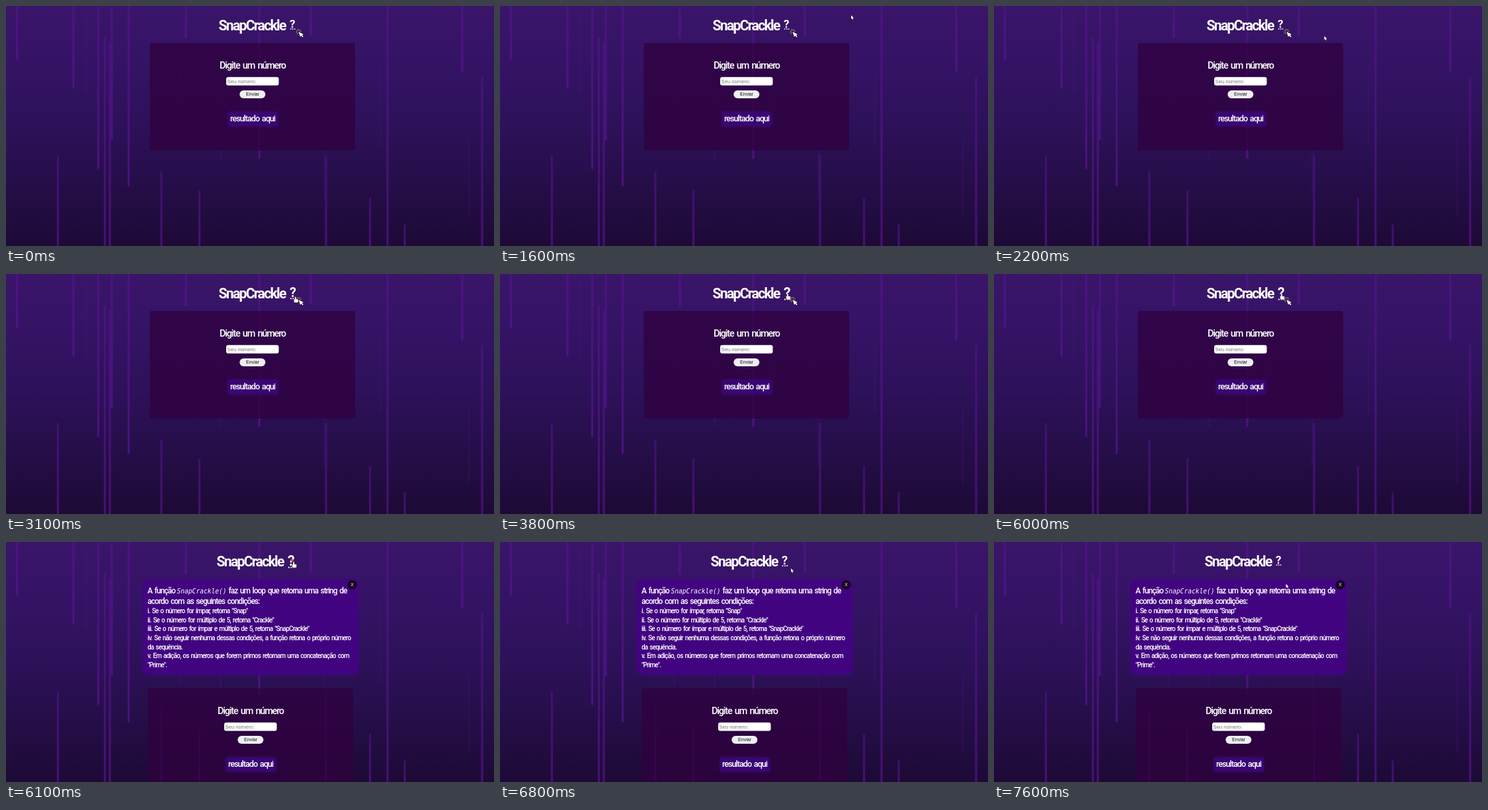
An HTML page with a canvas for the animation above (8 s loop, 738x364 px).

```html
<!DOCTYPE html>
<html lang="pt-BR">
<head>
<meta charset="utf-8">
<title>SnapCrackle</title>
<style>
html, body { margin: 0; width: 100%; height: 100%; overflow: hidden; background: #1d0b38; }
canvas { display: block; width: 738px; height: 364px; }
</style>
</head>
<body>
<canvas id="stage" width="738" height="364"></canvas>
<script>
const W = 738, H = 364, LOOP = 8000, STEP = 100;
const HOVER_AT = 2900, OPEN_AT = 6100, LEAVE_AT = 6600;
const ctx = document.getElementById('stage').getContext('2d');
const ARIAL = '"Liberation Sans", Arial, sans-serif';

// Rain: x and the y where it ends (hanging) or begins (standing)
const hanging = [[16.5, 81], [102, 125], [139.5, 247], [160, 203], [185.5, 273], [272, 49], [383, 232], [461, 45], [690, 100]];
const standing = [[78.5, 226], [149.5, 48], [157, 55], [235, 251], [292.5, 280], [484, 226], [550.5, 291], [577, 0], [603, 331], [720, 108]];

const rules = [
  'i. Se o número for ímpar, retorna "Snap"',
  'ii. Se o número for múltiplo de 5, retorna "Crackle"',
  'iii. Se o número for ímpar e múltiplo de 5, retorna "SnapCrackle"',
  'iv. Se não seguir nenhuma dessas condições, a função retona o próprio número',
  'da sequência.',
  'v. Em adição, os números que forem primos retornam uma concatenação com',
  '"Prime".'
];

// Pointer tip: time, x, y
const path = [
  [1600, 531, 14], [2200, 499.5, 45.5], [3000, 438, 36], [3400, 434.5, 30],
  [LEAVE_AT, 434.5, 30], [7200, 451, 60], [7500, 441.5, 63.5]
];

const clamp = v => Math.max(0, Math.min(1, v));
const mix = (a, b, u) => a + (b - a) * u;

function seeded(seed) {
  return () => (seed = seed * 16807 % 2147483647) / 2147483647;
}

function box(x, y, w, h, r, color, glow = 0) {
  ctx.fillStyle = ctx.shadowColor = color;
  ctx.shadowBlur = glow;
  ctx.beginPath();
  ctx.roundRect(x, y, w, h, r);
  ctx.fill();
  ctx.shadowBlur = 0;
}

function text(str, x, y, font, color, track = 0, gap = 0) {
  ctx.font = font;
  ctx.letterSpacing = track + 'px';
  ctx.wordSpacing = gap + 'px';
  ctx.fillStyle = color;
  ctx.fillText(str, x, y);
}

const label = (str, x, y, size, weight = 500) =>
  text(str, x, y, `${weight} ${size}px Roboto, sans-serif`, '#fff', size * -0.082, size * 0.127);

const plain = (str, x, y, size, color) => text(str, x, y, `${size}px ${ARIAL}`, color);

function streak(x, top, bottom, width, strength) {
  const fade = ctx.createLinearGradient(0, top, 0, bottom);
  fade.addColorStop(0, `rgba(92,20,148,${strength * 0.7})`);
  fade.addColorStop(1, `rgba(92,20,148,${strength})`);
  box(x - width / 2, top, width, bottom - top, width / 2, '#000');
  ctx.fillStyle = fade;
}

function rain(x, top, bottom, strength) {
  const fade = ctx.createLinearGradient(0, top, 0, bottom);
  fade.addColorStop(0, `rgba(92,20,148,${strength * 0.7})`);
  fade.addColorStop(1, `rgba(92,20,148,${strength})`);
  ctx.fillStyle = fade;
  ctx.fillRect(x - 1.6, top, 3.2, bottom - top);
}

function background() {
  const sky = ctx.createLinearGradient(0, 0, 0, H);
  ['#3a1569', '#341365', '#2d1159', '#250e48', '#1d0a36']
    .forEach((color, i, all) => sky.addColorStop(i / (all.length - 1), color));
  ctx.fillStyle = sky;
  ctx.fillRect(0, 0, W, H);
  const rnd = seeded(11);
  for (let i = 0; i < 8; i++) {
    const x = (i + rnd()) * W / 8, y = rnd() * 240;
    rain(x, y, y + 120, 0.15);
  }
  hanging.forEach(([x, end]) => rain(x, 0, end, 0.65));
  standing.forEach(([x, start]) => rain(x, start, H, 0.65));
}

function arrow(x, y, size, turn) {
  ctx.save();
  ctx.translate(x, y);
  ctx.rotate(turn);
  ctx.scale(size, size);
  ctx.beginPath();
  [[0, 0], [0, 5.8], [1.3, 4.7], [2.3, 6.8], [3.3, 6.3], [2.4, 4.3], [4.2, 4.2]]
    .forEach(p => ctx.lineTo(...p));
  ctx.closePath();
  ctx.lineWidth = 0.8;
  ctx.strokeStyle = '#1a0a28';
  ctx.stroke();
  ctx.fillStyle = '#fff';
  ctx.fill();
  ctx.restore();
}

function hand(x, y) {
  for (const [edge, color] of [[0.5, '#241033'], [0, '#fff']]) {
    const part = (dx, dy, w, h) =>
      box(x + dx - edge, y + dy - edge, w + 2 * edge, h + 2 * edge, 1, color);
    part(-0.3, 0, 1.8, 6);
    part(-1.6, 3.8, 6.4, 5);
  }
}

function clickIcon() {
  ctx.strokeStyle = '#d8ad38';
  ctx.lineWidth = 1;
  for (let i = 0; i < 6; i++) {
    const a = 2.1 + i * 0.78, c = Math.cos(a), s = Math.sin(a);
    ctx.beginPath();
    ctx.moveTo(442.5 + c * 2, 39 + s * 2);
    ctx.lineTo(442.5 + c * 4.2, 39 + s * 4.2);
    ctx.stroke();
  }
  arrow(442.5, 39, 1.45, -0.3);
}

function header(t, dx) {
  label('SnapCrackle', 321.5 + dx, 36.8, 21.2, 700);
  const hover = clamp((t - HOVER_AT) / 300) - clamp((t - LEAVE_AT) / 300);
  ctx.save();
  ctx.translate(429.5 + dx, 20);
  ctx.scale(1 + hover / 4, 1 + hover / 4);
  label('?', -0.5, 13, 17, 600);
  for (let i = 0; i < 3; i++) box(0.3 + i * 3, 14, 1.6, 1.6, 0, '#fff');
  ctx.restore();
}

function info() {
  box(206, 56.5, 327.5, 145, 9, 'rgba(68,2,132,.75)', 3);
  label('A função', 214, 78, 12);
  text('SnapCrackle()', 258.5, 78, 'italic 9.6px "DejaVu Sans Mono", monospace', '#fff');
  label('faz um loop que retorna uma string de', 336.5, 78, 12);
  label('acordo com as seguintes condições:', 214, 94, 12);
  rules.forEach((rule, i) => label(rule, 214, 108.3 + i * 13.55, 10));
  box(516.5, 58, 14, 14, 7, '#15021f');
  plain('X', 521.2, 67.4, 6.8, '#fff');
}

function form(dx, dy) {
  ctx.save();
  ctx.translate(dx, dy);
  box(217.5, 56, 310.5, 163, 3, 'rgba(48,0,62,.74)');
  label('Digite um número', 323, 95, 14.5);
  box(333, 107.8, 79.5, 12.6, 3, '#fff');
  plain('Seu número:', 334.5, 116.6, 7.7, '#757575');
  box(353.3, 128, 39, 12, 6, '#f0eef2');
  plain('Enviar', 363, 136.4, 7.1, '#111');
  box(335.5, 160.5, 75.5, 22, 3, '#390672', 3);
  label('resultado aqui', 339, 175, 12.7);
  ctx.restore();
}

function tooltip() {
  box(437, 35, 51.5, 10, 0, '#77767a');
  box(437.6, 35.6, 50.3, 8.8, 0, '#201e22');
  text('O que é SnapCrackle?', 440.5, 41.6, '4.4px "Open Sans", sans-serif', '#eee');
}

function pointer(t) {
  if (t < path[0][0]) return;
  const next = path.findIndex(([time]) => time > t);
  const i = next < 0 ? path.length - 1 : next;
  const [t0, x0, y0] = path[i - 1], [t1, x1, y1] = path[i];
  const u = clamp((t - t0) / (t1 - t0));
  const x = mix(x0, x1, u), y = mix(y0, y1, u);
  if (t > HOVER_AT && t <= LEAVE_AT) hand(x, y);
  else arrow(x, y, 1, 0);
}

function render(t) {
  const open = t >= OPEN_AT;
  const dx = open ? -3 : 0;
  background();
  form(dx, open ? 166 : 0);
  header(t, dx);
  if (open) info();
  else clickIcon();
  if (open && t < 6400) box(431, 26, 4, 4, 2, '#d8434f');
  pointer(t);
  if (t >= 4400 && t < 5900) tooltip();
}

function tick() {
  const t = performance.now() % LOOP;
  render(Math.floor(t / STEP) * STEP);
  requestAnimationFrame(tick);
}
tick();
</script>
</body>
</html>
```
